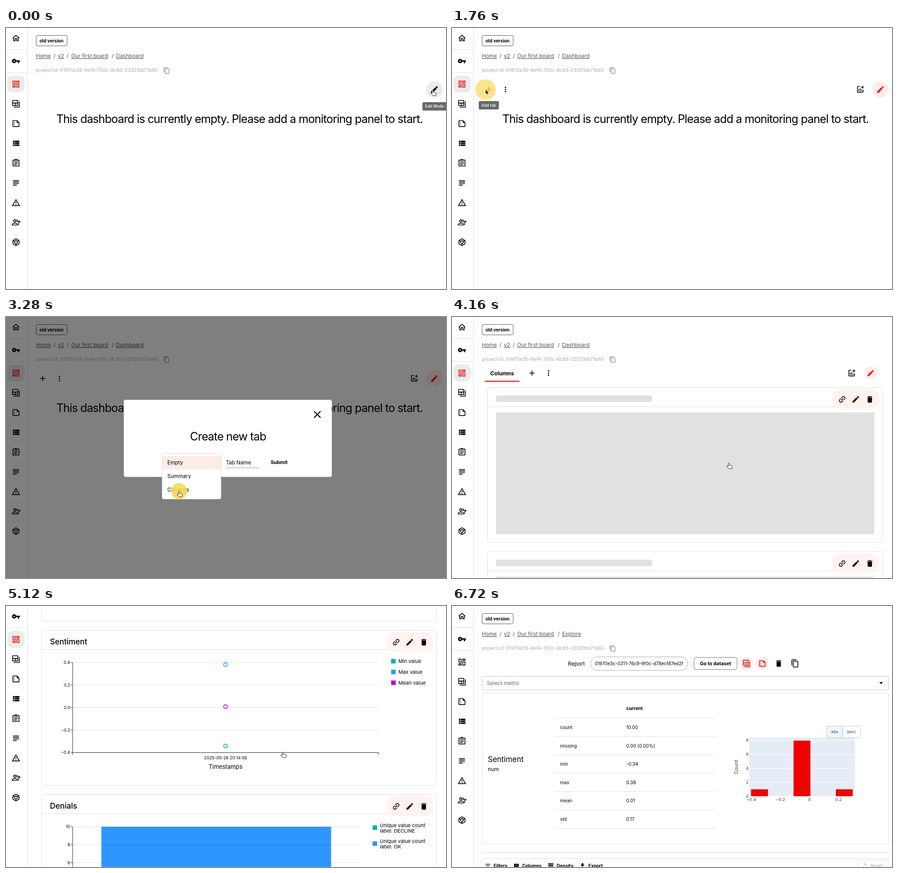
Recreate the animation shown at these times as an HTML page. Size 971 by 577 pixels, loop 7.12 s.

```html
<!DOCTYPE html>
<html lang="en">
<head>
<meta charset="utf-8">
<title>Dashboard walkthrough</title>
<style>
  html, body { margin: 0; width: 100%; height: 100%; overflow: hidden; background: #fff; }
  svg { display: block; width: 971px; height: 577px; font-family: Inter, "Open Sans", sans-serif; }
  .plot { font-family: "DejaVu Sans", sans-serif; }
  .big { letter-spacing: -.034em; }
  .b { font-weight: 700; }
  .m { font-weight: 500; }
  .mid { text-anchor: middle; }
  .end { text-anchor: end; }
  .u { text-decoration: underline; }
</style>
</head>
<body>
<svg id="stage" viewBox="0 0 971 577"></svg>
<script>
const LOOP = 7120, STEP = 80;
const RED = '#ed0400', PINK = '#ffebea', BLUE = '#2e96ff', TEAL = '#02b2af', PURPLE = '#b800d8';

const ICONS = {
  home: 'm12 5.69 5 4.5V18h-2v-6H9v6H7v-7.81l5-4.5M12 3 2 12h3v8h6v-6h2v6h6v-8h3L12 3z',
  key: 'M12.65 10C11.83 7.67 9.61 6 7 6c-3.31 0-6 2.69-6 6s2.69 6 6 6c2.61 0 4.83-1.67 5.65-4H17v4h4v-4h2v-4H12.65zM7 14c-1.1 0-2-.9-2-2s.9-2 2-2 2 .9 2 2-.9 2-2 2z',
  dash: 'M19 5v2h-4V5h4M9 5v6H5V5h4m10 8v6h-4v-6h4M9 17v2H5v-2h4M21 3h-8v6h8V3zM11 3H3v10h8V3zm10 8h-8v10h8V11zm-10 4H3v6h8v-6z',
  table: 'M20 6v14H6v2h14c1.1 0 2-.9 2-2V6h-2zM16 2H4c-1.1 0-2 .9-2 2v12c0 1.1.9 2 2 2h12c1.1 0 2-.9 2-2V4c0-1.1-.9-2-2-2zM9 16H4v-5h5v5zm7 0h-5v-5h5v5zm0-7H4V4h12v5z',
  file: 'M15 3H5c-1.1 0-2 .9-2 2v14c0 1.1.9 2 2 2h14c1.1 0 2-.9 2-2V9l-6-6zM5 19V5h9v5h5v9H5zM7 8a1 1 0 1 0 2 0 1 1 0 0 0-2 0zM7 12a1 1 0 1 0 2 0 1 1 0 0 0-2 0zM7 16a1 1 0 1 0 2 0 1 1 0 0 0-2 0z',
  list: 'M4 14h4v-4H4v4zm0 5h4v-4H4v4zM4 9h4V5H4v4zm5 5h12v-4H9v4zm0 5h12v-4H9v4zM9 5v4h12V5H9z',
  task: 'M7 15h7v2H7zm0-4h10v2H7zm0-4h10v2H7zm12-4h-4.18C14.4 1.84 13.3 1 12 1c-1.3 0-2.4.84-2.82 2H5c-1.1 0-2 .9-2 2v14c0 1.1.9 2 2 2h14c1.1 0 2-.9 2-2V5c0-1.1-.9-2-2-2zM19 19H5V5h14v14z',
  notes: 'M14 17H4v2h10v-2zm6-8H4v2h16V9zM4 15h16v-2H4v2zM4 5v2h16V5H4z',
  warn: 'M12 5.99 19.53 19H4.47L12 5.99M12 2 1 21h22L12 2zm1 14h-2v2h2v-2zm0-6h-2v4h2v-4z',
  edit: 'M3 17.25V21h3.75L17.81 9.94l-3.75-3.75L3 17.25zM20.71 7.04c.39-.39.39-1.02 0-1.41l-2.34-2.34a1 1 0 0 0-1.41 0l-1.83 1.83 3.75 3.75 1.83-1.83z',
  copy: 'M16 1H4c-1.1 0-2 .9-2 2v14h2V3h12V1zm3 4H8c-1.1 0-2 .9-2 2v14c0 1.1.9 2 2 2h11c1.1 0 2-.9 2-2V7c0-1.1-.9-2-2-2zm0 16H8V7h11v14z',
  more: 'M10 6a2 2 0 1 0 4 0 2 2 0 0 0-4 0zM10 12a2 2 0 1 0 4 0 2 2 0 0 0-4 0zM10 18a2 2 0 1 0 4 0 2 2 0 0 0-4 0z',
  add: 'M19 13h-6v6h-2v-6H5v-2h6V5h2v6h6v2z',
  chart: 'M22 5v2h-3v3h-2V7h-3V5h3V2h2v3h3zm-3 14H5V5h6V3H5c-1.1 0-2 .9-2 2v14c0 1.1.9 2 2 2h14c1.1 0 2-.9 2-2v-6h-2v6zm-4-6v4h2v-4h-2zm-4 4h2V9h-2v8zm-2 0v-6H7v6h2z',
  link: 'M3.9 12c0-1.71 1.39-3.1 3.1-3.1h4V7H7c-2.76 0-5 2.24-5 5s2.24 5 5 5h4v-1.9H7c-1.71 0-3.1-1.39-3.1-3.1zM8 13h8v-2H8v2zm9-6h-4v1.9h4c1.71 0 3.1 1.39 3.1 3.1s-1.39 3.1-3.1 3.1h-4V17h4c2.76 0 5-2.24 5-5s-2.24-5-5-5z',
  bin: 'M6 19c0 1.1.9 2 2 2h8c1.1 0 2-.9 2-2V7H6v12zM19 4h-3.5l-1-1h-5l-1 1H5v2h14V4z',
  close: 'M19 6.41 17.59 5 12 10.59 6.41 5 5 6.41 10.59 12 5 17.59 6.41 19 12 13.41 17.59 19 19 17.59 13.41 12z',
  drop: 'M7 10l5 5 5-5z',
  filter: 'M10 18h4v-2h-4v2zM3 6v2h18V6H3zm3 7h12v-2H6v2z',
  cols: 'M4 5h4.7v14H4zm5.7 0h4.6v14H9.7zm5.6 0H20v14h-4.7z',
  rows: 'M21 8H3V4h18zm0 6H3v-4h18zm0 6H3v-4h18z',
  save: 'M19 9h-4V3H9v6H5l7 7 7-7zM5 18v2h14v-2H5z',
  reset: 'M12 5V1L7 6l5 5V7c3.31 0 6 2.69 6 6s-2.69 6-6 6-6-2.69-6-6H4c0 4.42 3.58 8 8 8s8-3.58 8-8-3.58-8-8-8z'
};
const OUTLINES = {
  people: 'M6 8a3 3 0 1 0 6 0 3 3 0 0 0-6 0zM2 19v-1.2C2 15.2 6 14 9 14s7 1.2 7 3.8V19zM14 5a3.2 3.2 0 0 1 0 6M17 14.5q2.5 1 2.5 4.5M20.5 7v7M17 10.5h7',
  cube: 'M12 3l8 4.5v9L12 21l-8-4.5v-9zM12 8l3.5 2v4L12 16l-3.5-2v-4zM4 7.5l4.5 2.5M20 7.5l-4.5 2.5M12 16v5'
};

const text = (x, y, size, str, cls = '', more = '') =>
  `<text x="${x}" y="${y}" font-size="${size}" class="${cls}" ${more}>${str}</text>`;
const rect = (x, y, w, h, fill, r = 0, stroke = 'none') =>
  `<rect x="${x}" y="${y}" width="${w}" height="${h}" rx="${r}" fill="${fill}" stroke="${stroke}"/>`;
const line = (x1, y1, x2, y2, c = '#e0e0e0', w = 1) =>
  `<path d="M${x1} ${y1}L${x2} ${y2}" stroke="${c}" stroke-width="${w}"/>`;
const dot = (x, y, r, fill, more = '') => `<circle cx="${x}" cy="${y}" r="${r}" fill="${fill}" ${more}/>`;
const group = (id, body) => `<g id="${id}">${body}</g>`;
const icon = (name, x, y, size = 20, fill = '#000', turn = 0) => {
  const paint = OUTLINES[name] ? `fill="none" stroke="${fill}" stroke-width="2"` : `fill="${fill}"`;
  return `<path transform="translate(${x} ${y}) rotate(${turn}) scale(${size / 24}) translate(-12 -12)" ${paint} d="${ICONS[name] || OUTLINES[name]}"/>`;
};
const tip = (id, x, y, w, h, str) =>
  group(id, rect(x, y, w, h, '#676767', 3) + text(x + 6, y + h / 2 + 3, 8.6, str, 'm', 'fill="#fff"'));

function sidebar() {
  const names = ['table', 'file', 'list', 'task', 'notes', 'warn', 'people', 'cube'];
  return rect(0, 0, 47, 640, '#fff') + line(47.5, 0, 47.5, 640) +
    icon('home', 22, 22.5) + line(0, 47.5, 47, 47.5) + icon('key', 22, 73, 19) + line(0, 98.5, 47, 98.5) +
    group('dashOn', rect(3, 105, 38, 37.5, '#ebebeb', 11) + icon('dash', 22, 124, 20, RED)) +
    group('dashOff', icon('dash', 22, 124)) +
    names.map((n, i) => icon(n, 22, 167.5 + i * 43.7)).join('');
}

function header() {
  const grey = 'fill="#555"', crumb = (x, s) => text(x, 66, 11.75, s, 'u', grey);
  const slash = x => text(x, 66, 11.75, '/', '', grey);
  return rect(66.5, 16.5, 68.5, 23, '#fff', 3.5, '#555') + text(100.5, 31.5, 9.8, 'old version', 'b mid') +
    crumb(66, 'Home') + slash(105) + crumb(114.5, 'v2') + slash(134) +
    crumb(144, 'Our first board') + slash(233.5) +
    group('crumbDash', crumb(243, 'Dashboard')) + group('crumbExplore', crumb(243, 'Explore')) +
    text(66, 97, 10.66, 'project id: 01970e35-9ef4-700c-8c83-23331bb71b65', '', 'fill="#a9a9a9"') +
    icon('copy', 354.5, 94, 15.5, '#8a8a8a');
}

const actions = y => rect(839, y + 5, 104, 43, '#fff2f0', 20) +
  icon('link', 861, y + 27, 20, '#000', -45) + icon('edit', 891, y + 27, 19) + icon('bin', 922, y + 27, 19);
const frame = y => rect(78.5, y + .5, 872, 343, '#fff', 4, '#e0e0e0') + line(79, y + 43.5, 950, y + 43.5);
const skeleton = y => frame(y) + actions(y) +
  rect(97, y + 18.5, 345, 14.5, '#e1e1e1', 4) + rect(97, y + 56, 835, 269, '#e1e1e1');

// Axes share one vertical layout: 72 to 271 px below the panel top.
function axes(y, right, labels) {
  const top = y + 72, gap = 199 / (labels.length - 1), mid = (147 + right) / 2;
  return labels.map((s, i) => {
    const gy = top + i * gap;
    return line(147, gy, right, gy, 'rgba(0,0,0,.12)') + line(143, gy, 147, gy, '#222') +
      text(141.5, gy + 3.4, 9.2, s, 'end');
  }).join('') +
    `<path d="M147 ${top}V${y + 276}M147 ${y + 271}H${right}V${y + 276}" fill="none" stroke="#222"/>` +
    text(mid, y + 285.5, 9.35, '2025-05-26 20:14:56', 'mid') + text(mid, y + 306.5, 12.9, 'Timestamps', 'mid');
}
const title = (y, s) => text(97, y + 31.5, 17, s, 'm');

function pointPanel(y, name, labels, offsets) {
  const colors = [TEAL, BLUE, PURPLE];
  return frame(y) + actions(y) + title(y, name) + axes(y, 822, labels) +
    offsets.map((o, i) => dot(484.5, y + o, 4.2, '#fff', `stroke="${colors[i]}" stroke-width="1.8"`)).join('') +
    ['Min', 'Max', 'Mean'].map((s, i) => {
      const ly = y + 69 + i * 23.8;
      return rect(850, ly - 5, 10, 10, colors[i]) + text(866, ly + 4, 11, s + ' value');
    }).join('');
}

function barPanel(y) {
  return frame(y) + actions(y) + title(y, 'Denials') +
    rect(210.5, y + 72, 507, 159.2, BLUE) + rect(210.5, y + 231.2, 507, 39.8, TEAL) +
    group('band', rect(147, y + 72, 634, 199, 'rgba(0,0,0,.1)')) +
    axes(y, 781, [10, 8, 6, 4, 2, 0]) +
    [['DECLINE', TEAL], ['OK', BLUE]].map(([s, c], i) => {
      const ly = y + 74 + i * 35.3;
      return rect(809, ly - 5, 10, 10, c) + text(825, ly - 1, 11, 'Unique value count') + text(825, ly + 10.5, 11, 'label: ' + s);
    }).join('') +
    group('viewReport', rect(857.5, y + 309.5, 85.5, 27.5, '#fff', 4, '#777') +
      text(900, y + 327.5, 10.5, 'View report', 'b mid'));
}

const emptyPage = () =>
  text(111, 209.5, 25, 'This dashboard is currently empty. Please add a monitoring panel to start.', 'big') +
  group('editOff', dot(945.5, 136, 18, '#ebebeb') + icon('edit', 945.5, 136, 20)) +
  group('editOn', dot(945.5, 136, 18, PINK) + icon('edit', 945.5, 136, 19, RED) +
    icon('chart', 901, 135.5, 19) + icon('more', 118, 136, 19) +
    group('ring', dot(81, 136, 14.5, '#dadada')) + group('plus', icon('add', 81, 136, 20)) +
    group('plusHot', icon('add', 81, 136, 20, RED)));

const tabBar = () =>
  text(110.5, 128.8, 12.05, 'Columns', 'b mid') + line(72, 142, 149, 142, RED, 2) +
  icon('add', 176.5, 124, 20) + icon('more', 213, 124, 19) + icon('chart', 882, 124, 19) +
  dot(924, 124, 14.5, PINK) + icon('edit', 924, 124, 18, RED);

const dialog = () => rect(0, 0, 971, 577, 'rgba(0,0,0,.5)') + rect(260, 183, 459, 170.5, '#fff', 4) +
  icon('close', 687, 215.5, 27) + text(490, 272.5, 25, 'Create new tab', 'big mid') +
  text(352, 308, 8.5, 'Tab Template', '', 'fill="#666"') +
  group('optEmpty', text(352, 326, 11.6, 'Empty')) + group('optColumns', text(352, 326, 11.6, 'Columns')) +
  icon('drop', 457.5, 323, 20, '#666') + line(352, 333.5, 467, 333.5, '#999') +
  text(485, 326, 11.6, 'Tab Name') + line(485, 333.5, 560, 333.5, '#999') +
  group('focus', line(485, 333.5, 560, 333.5, '#000', 1.6)) + group('caret', line(485.5, 315, 485.5, 330, '#000')) +
  text(584, 324.8, 10.8, 'Submit', 'b');

const menu = () => rect(344.5, 301.5, 130, 101, '#fff', 4, '#d8d8d8') + rect(345, 307, 129, 30, '#fdebea') +
  ['Empty', 'Summary', 'Columns'].map((s, i) => text(356, 326 + i * 30, 11.6, s)).join('');

const reportBar = () =>
  text(256, 131.8, 11.8, 'Report') + rect(306, 112.5, 214.5, 30, '#fff', 15, '#aaa') +
  text(315, 130.8, 9.95, '01970e3c-0311-76c9-9f0c-d78ecf87ed2f') + line(527.5, 112, 527.5, 143) +
  rect(534, 113.5, 95, 27, '#fff', 4, '#777') + text(581.5, 131, 10.6, 'Go to dataset', 'b mid') +
  dot(650, 127, 14.5, PINK) + icon('table', 650, 127, 19, RED) + dot(685, 127, 14.5, PINK) + icon('file', 685, 127, 19, RED) +
  icon('bin', 721, 127, 19) + icon('copy', 757, 127, 19) +
  rect(66.5, 155.5, 897, 30, '#fff', 4, '#c0c0c0') + text(77, 175, 11.6, 'Select metric', '', 'fill="#666"') +
  icon('drop', 947, 170, 20);

function reportCard() {
  const rows = [['count', '10.00'], ['missing', '0.00 (0.00%)'], ['min', '-0.34'], ['max', '0.38'], ['mean', '0.01'], ['std', '0.17']];
  const tools = [['filter', 79, 'Filters'], ['cols', 142, 'Columns'], ['rows', 218, 'Density'], ['save', 288, 'Export']];
  const ink = 'fill="#2a3f5f"';
  return rect(66.5, 192.5, 897, 333.5, '#fff', 4, '#e0e0e0') +
    text(79, 344.5, 16.6, 'Sentiment') + text(79, 365, 11.9, 'num') +
    text(384.5, 230, 10.2, 'current', 'b') + line(226, 247.8, 582, 247.8) +
    rows.map(([k, v], i) => text(238.5, 272 + i * 40.6, 10.2, k) + text(384.5, 272 + i * 40.6, 10.2, v) +
      line(226, 288.5 + i * 40.6, 582, 288.5 + i * 40.6)).join('') +
    `<g class="plot">` + rect(656, 291, 233, 129.5, '#e5ecf6') +
    [8, 6, 4, 2, 0].map((n, i) => (n ? line(656, 297 + i * 31, 889, 297 + i * 31, '#fff') : '') +
      text(654.5, 300.3 + i * 31, 9, n, 'end', ink)).join('') +
    rect(660, 405.2, 37.3, 15.3, RED) + rect(753.7, 297.5, 37.3, 123, RED) + rect(847, 405.2, 37.3, 15.3, RED) +
    ['−0.4', '−0.2', '0', '0.2'].map((s, i) => text(660 + i * 64.4, 431, 9, s, 'mid', ink)).join('') +
    text(0, 0, 10.6, 'Count', 'mid', ink + ' transform="translate(630.5 355.5) rotate(-90)"') +
    rect(827, 265.5, 35, 25.5, '#f1f6fb', 1, '#c4cbd3') + text(844.5, 280.5, 9.2, 'abs', 'mid', ink) +
    rect(863, 265.5, 38.5, 25.5, '#fff', 1, '#c4cbd3') + text(882, 280.5, 9.2, 'perc', 'mid', ink) + '</g>' +
    line(66, 545.5, 963, 545.5, '#d8d8d8') + rect(66.5, 558.5, 897, 40, '#fff', 4, '#e0e0e0') +
    tools.map(([n, x, s]) => icon(n, x, 574, 15) + text(x + 13, 577.5, 9.9, s, 'b')).join('') +
    rect(897.5, 562.5, 62, 26, '#fff', 4, '#ddd') + icon('reset', 911, 574, 13, '#b5b5b5') + text(924, 577.5, 10, 'Reset', 'm', 'fill="#b5b5b5"');
}

const HAND = 'M-1.4 6.5V1.2a1.2 1.2 0 0 1 2.4 0V4.5l4.8 1.1q1.8.5 1.6 2.3l-.9 4.4H.3L-4.4 8q-.8-1.4.6-1.7 1 0 2.4 1.5z';
const ARROW = 'M0 0V10.5l2.4-2.2 1.8 4 1.8-.8-1.8-3.9H7.5z';

const stage = document.getElementById('stage');
stage.innerHTML = rect(0, 0, 971, 577, '#fff') +
  group('page', group('head', header()) + group('empty', emptyPage()) +
    group('board', tabBar() + group('loading', skeleton(155) + skeleton(518)) +
      group('panels', pointPanel(155, 'Text Length', [200, 150, 100, 50, 0], [238, 97, 166]) +
        pointPanel(518, 'Sentiment', ['0.4', '0.2', '0.0', '−0.2', '−0.4'], [256.5, 76.5, 169.5]) + barPanel(881))) +
    group('bar', reportBar()) + group('card', reportCard())) +
  group('side', sidebar()) +
  tip('editTip', 919, 164, 60, 18.5, 'Edit Mode') + tip('addTip', 59, 161.5, 44.5, 18.5, 'Add tab') +
  group('dialog', dialog()) + group('menu', menu()) +
  dot(0, 0, 20, '#fada55', 'id="click"') +
  group('cursor', `<path id="hand" d="${HAND}" fill="#fff" stroke="#222"/><path id="arrow" d="${ARROW}" fill="#000" stroke="#fff" stroke-width=".8"/>`);

const el = {};
stage.querySelectorAll('[id]').forEach(n => el[n.id] = n);

const CLICKS = [480, 1680, 2560, 3280, 3840, 5520, 6160];
const PATH = [[0, 942, 137], [880, 942, 137], [1360, 26, 128], [1520, 74, 136], [1920, 74, 136], [2080, 325, 297],
  [2160, 325, 297], [2400, 382, 321], [2960, 382, 321], [3120, 382, 385], [3440, 382, 385], [3680, 611, 323],
  [5760, 611, 323], [6080, 900, 537], [LOOP, 900, 537]];
const SCROLL = [[0, 0], [4480, 0], [4560, 40], [4720, 270], [4880, 400], [5040, 400], [5120, 465], [5200, 560],
  [5280, 620], [5360, 652], [5440, 666], [6399, 666], [6400, 0], [LOOP, 0]];

function sample(keys, t, ease = p => p) {
  const i = Math.max(1, keys.findIndex(k => k[0] >= t)), a = keys[i - 1], b = keys[i];
  const p = ease((t - a[0]) / (b[0] - a[0]));
  return a.slice(1).map((v, j) => v + (b[j + 1] - v) * p);
}
const smooth = p => p * p * (3 - 2 * p);
const ramp = (t, a, b) => Math.min(1, Math.max(0, (t - a) / (b - a)));
const show = (id, o) => el[id].setAttribute('opacity', +o);

function draw(t) {
  const span = (a, b) => t >= a && t < b;
  const [scroll] = sample(SCROLL, t);
  el.page.setAttribute('transform', `translate(0 ${-scroll})`);
  el.side.setAttribute('transform', `translate(0 ${-Math.min(50, scroll)})`);

  const explore = t >= 6560;
  show('dashOn', !explore); show('dashOff', explore);
  show('crumbDash', !explore); show('crumbExplore', explore);
  show('bar', explore); show('card', t >= 6640);

  show('empty', t < 4080);
  show('editOff', t < 560); show('editOn', t >= 560);
  show('plusHot', span(1520, 1840)); show('plus', !span(1520, 1840)); show('ring', span(1840, 2560));
  show('editTip', 1 - ramp(t, 880, 1040)); show('addTip', span(1520, 1840));

  show('board', span(4080, 6400));
  show('loading', t < 4240); show('panels', t >= 4240);
  show('band', t >= 5520); show('viewReport', t >= 5600);

  show('dialog', ramp(t, 1760, 1920) * (1 - ramp(t, 3920, 4080)));
  show('optEmpty', t < 3360); show('optColumns', t >= 3360);
  show('focus', t < 2640); show('caret', t < 2320);
  show('menu', ramp(t, 2560, 2800) * (1 - ramp(t, 3280, 3520)));

  const [x, y] = sample(PATH, t, smooth);
  el.cursor.setAttribute('transform', `translate(${x} ${y})`);
  const arrow = span(960, 2320) || span(3520, 3680) || span(5840, 6080);
  show('cursor', !explore); show('arrow', arrow); show('hand', !arrow);

  const start = CLICKS.find(c => span(c, c + 240)), age = (t - start) / STEP;
  show('click', start === undefined ? 0 : .9 - .21 * age);
  if (start !== undefined) {
    el.click.setAttribute('cx', x);
    el.click.setAttribute('cy', y);
    el.click.setAttribute('r', 17.7 + 4.9 * age);
  }
}

const began = performance.now();
function tick() {
  draw(Math.floor((performance.now() - began) % LOOP / STEP) * STEP);
  requestAnimationFrame(tick);
}
tick();
</script>
</body>
</html>
```
